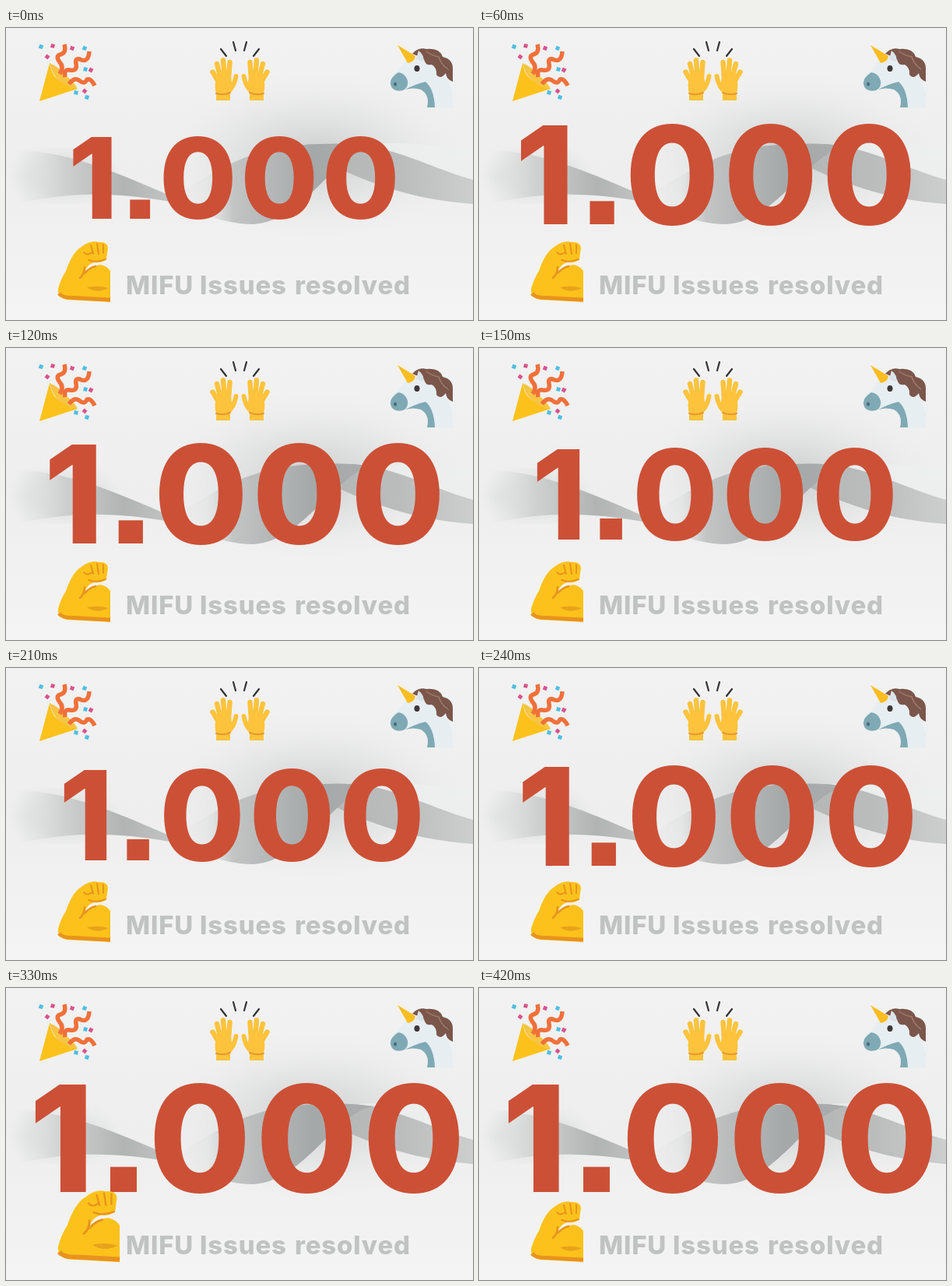
Recreate the animation shown at these times as an HTML page. Size 600 px wide and 375 px high, loop 1.53 s.

```html
<!DOCTYPE html>
<html lang="en">
<head>
<meta charset="utf-8">
<title>1.000 issues resolved</title>
<style>
  html, body { margin: 0; width: 100%; height: 100%; overflow: hidden; background: #f3f3f3; }
  svg { display: block; width: 100vw; height: 100vh; }
  text { font-family: Inter, "Open Sans", sans-serif; }
  .count { font-size: 190px; font-weight: 840; fill: #cc5036; text-anchor: middle; font-feature-settings: "ss07"; }
  .label { font-size: 33px; font-weight: 800; fill: #c1c2c2; letter-spacing: .8px; }
  .line { fill: none; stroke-linecap: round; stroke-linejoin: round; }
</style>
</head>
<body>
<svg viewBox="0 0 600 375" preserveAspectRatio="none">
  <defs>
    <radialGradient id="shade">
      <stop offset="0" stop-color="#c6c7c7" stop-opacity=".9"/>
      <stop offset=".5" stop-color="#d8d9d9" stop-opacity=".5"/>
      <stop offset="1" stop-color="#eee" stop-opacity="0"/>
    </radialGradient>
    <linearGradient id="paper" x2="0" y2="1">
      <stop offset="0" stop-color="#f2f2f2"/>
      <stop offset=".5" stop-color="#eeeeee"/>
      <stop offset="1" stop-color="#f4f4f4"/>
    </linearGradient>
    <linearGradient id="left">
      <stop offset="0" stop-color="#e4e5e5" stop-opacity="0"/>
      <stop offset=".3" stop-color="#d0d2d2"/>
      <stop offset=".7" stop-color="#b2b4b4"/>
      <stop offset="1" stop-color="#c2c4c4"/>
    </linearGradient>
    <linearGradient id="mid">
      <stop offset="0" stop-color="#d9dada" stop-opacity="0"/>
      <stop offset=".2" stop-color="#d4d5d5" stop-opacity=".25"/>
      <stop offset=".32" stop-color="#c3c5c5"/>
      <stop offset=".7" stop-color="#a5a8a8"/>
      <stop offset="1" stop-color="#acaeae"/>
    </linearGradient>
    <linearGradient id="right">
      <stop offset="0" stop-color="#b4b6b6"/>
      <stop offset=".5" stop-color="#bbbdbd"/>
      <stop offset="1" stop-color="#cdcece"/>
    </linearGradient>
    <filter id="soft"><feGaussianBlur stdDeviation="9"/></filter>

    <g id="hand">
      <g class="line" stroke="#fdc33c" stroke-width="6.400">
        <path d="M273 69L265.500 56.500M276 65L271 46M281 64L279 41.500M286 65L287.500 44"/>
        <path d="M287 80Q293 75 295.500 62" stroke-width="6"/>
      </g>
      <path d="M270.500 63Q280 57 289 63Q292 75 288 83V93H270V84Q267 73 270.500 63Z" fill="#fdc33c"/>
      <path class="line" d="M270 84Q279 87 288 83" stroke="#e8962e" stroke-width="2"/>
      <path class="line" d="M276 27L283 36M292 18L295 29" stroke="#333" stroke-width="2.200"/>
    </g>
  </defs>

  <rect width="600" height="375" fill="url(#paper)"/>
  <ellipse cx="395" cy="165" rx="205" ry="110" fill="url(#shade)"/>
  <ellipse cx="75" cy="190" rx="60" ry="30" fill="#dcdede" opacity=".7" filter="url(#soft)"/>
  <path d="M435 150Q520 144 600 156V200L500 165Z" fill="#eeefef" opacity=".8"/>
  <path d="M12 157C75 158 130 180 210 215V223C150 212 80 208 12 227Z" fill="url(#left)"/>
  <path d="M425 149C485 145 535 176 600 195V226C540 221 490 210 418 176Z" fill="url(#right)"/>
  <path d="M205 220C260 195 300 150 405 149Q440 147 475 152C425 155 385 248 318 252C275 252 245 235 205 220Z" fill="url(#mid)"/>

  <g id="popper">
    <path d="M43 94L56 45Q59 64 72 69Q82 74 92 78Z" fill="#fcc21b"/>
    <path d="M56 45Q68 50 78 62Q88 70 92 78Q80 77 69 68Q59 60 56 45Z" fill="#f6c544"/>
    <g class="line" stroke="#f0703a" stroke-width="5.500" style="stroke-linecap:butt">
      <path d="M69 59Q75 50 69 44Q63 36 70 34Q78 32 75 21"/>
      <path d="M76 63Q74 52 82 54Q92 56 90 46Q88 37 97 41Q106 44 107 30"/>
      <path d="M81 72Q88 62 95 68Q101 73 104 66Q109 64 114 74"/>
    </g>
    <g id="confetti"></g>
  </g>

  <use href="#hand"/>
  <use href="#hand" transform="matrix(-1 0 0 1 601 0)"/>

  <g id="unicorn">
    <path d="M545 36H574V102H545Z" fill="#edf2f5"/>
    <path d="M511 45Q520 32 536 33Q560 40 568 65L574 84V102H543Q546 86 535 77Q522 74 514 79Q497 86 494 72Q492 64 503 56Z" fill="#e6eef2"/>
    <path d="M504 57Q513 58 516 68Q517 77 510 80Q496 83 494 72Q493 64 504 57Z" fill="#7fa9b4"/>
    <path d="M513 79Q526 72 539 69Q550 78 551 102H541Q545 86 533 79Q523 76 513 79Z" fill="#7fa9b4"/>
    <path d="M522 33Q530 24 540 27Q557 25 561 37Q574 40 574 52V69Q566 66 565 58Q558 67 553 60Q554 51 547 47Q539 49 537 40Q530 36 522 33Z" fill="#7b564a"/>
    <path d="M540 30Q548 36 556 37Q559 47 568 53" class="line" stroke="#a37a6c" stroke-width="1.500"/>
    <path d="M527 40L530 29Q538 35 536 43Z" fill="#d8e3e8"/>
    <path d="M503 22L526 36Q525 44 516 45Z" fill="#fbbd1f"/>
    <ellipse cx="528" cy="52" rx="3.500" ry="4" fill="#403536"/>
    <ellipse cx="500" cy="72" rx="2" ry="2.500" fill="#456e79"/>
  </g>

  <text class="label" y="342"><tspan x="154">MIFU</tspan> <tspan x="249">Issues</tspan> <tspan x="371">resolved</tspan></text>

  <g id="count"><text class="count" y="256" x="71.500 151 249 386.500 524">1.000</text></g>

  <g id="arm">
    <path d="M97 281Q108 272 119 275Q130 274 131 282L129 297Q124 302 114 301Q104 303 101 314Q112 304 122 304Q130 306 134 312V352Q100 350 79 349Q66 347 67 335Q70 323 77 312Q85 288 97 281Z" fill="#fcc21b"/>
    <g class="line" stroke="#e8931e">
      <path d="M68 341Q73 347 88 346.500L134 349" stroke-width="5" style="stroke-linecap:butt"/>
      <path d="M101 307Q101 316 95 321M101 315Q107 308 115 306" stroke-width="2.500"/>
      <path d="M100 288Q104 293 111 288M109 279L112 290M117 277L119 290M125 278L125 289M106 298Q116 302 128 297" stroke-width="2"/>
    </g>
    <path d="M104 333Q116 342 132 334Q119 330 104 333Z" fill="#e8a31c"/>
  </g>
</svg>
<script>
const LOOP = 1530, STEP = 30, LAST = 14;
const byId = id => document.getElementById(id);

// step, scale, centre x, centre y
const keys = [
  [0, .76, 292, 192.5], [3, 1, 308.5, 187], [5, .84, 302, 188],
  [6, .76, 297, 189], [7, .84, 302, 189.5], [9, 1, 308.5, 192.5], [LAST, 1, 308.5, 192.5]
];

function pose(step) {
  const i = Math.max(1, keys.findIndex(k => k[0] >= step));
  const a = keys[i - 1], b = keys[i], p = (step - a[0]) / (b[0] - a[0]);
  return a.map((v, j) => v + (b[j] - v) * p);
}

const confetti = (color, spots) => spots.map(([x, y, turn]) =>
  `<rect x="${x - 2.5}" y="${y - 2.5}" width="5" height="5" fill="${color}" transform="rotate(${turn} ${x} ${y})"/>`).join("");
byId("confetti").innerHTML =
  confetti("#4dbfe2", [[45, 24, 20], [102, 53, 15], [101, 26, 25], [90, 83, 10], [104, 89, 20]]) +
  confetti("#d9538c", [[53, 37, 35], [85, 26, 20], [109, 54, 30], [60, 23, 15], [101, 81, 40]]);

function draw(now) {
  const step = Math.min(Math.floor(now % LOOP / STEP), LAST);
  const [, scale, x, y] = pose(step);
  byId("count").setAttribute("transform", `translate(${x} ${y}) scale(${scale}) translate(-308.5 -187)`);
  const flex = 1 + .06 * Math.max(0, 3 - Math.abs(step - 11));
  byId("arm").setAttribute("transform", `translate(67 352) scale(${flex}) translate(-67 -352)`);
}

const start = performance.now();
function tick() {
  draw(performance.now() - start);
  requestAnimationFrame(tick);
}
tick();
</script>
</body>
</html>
```
